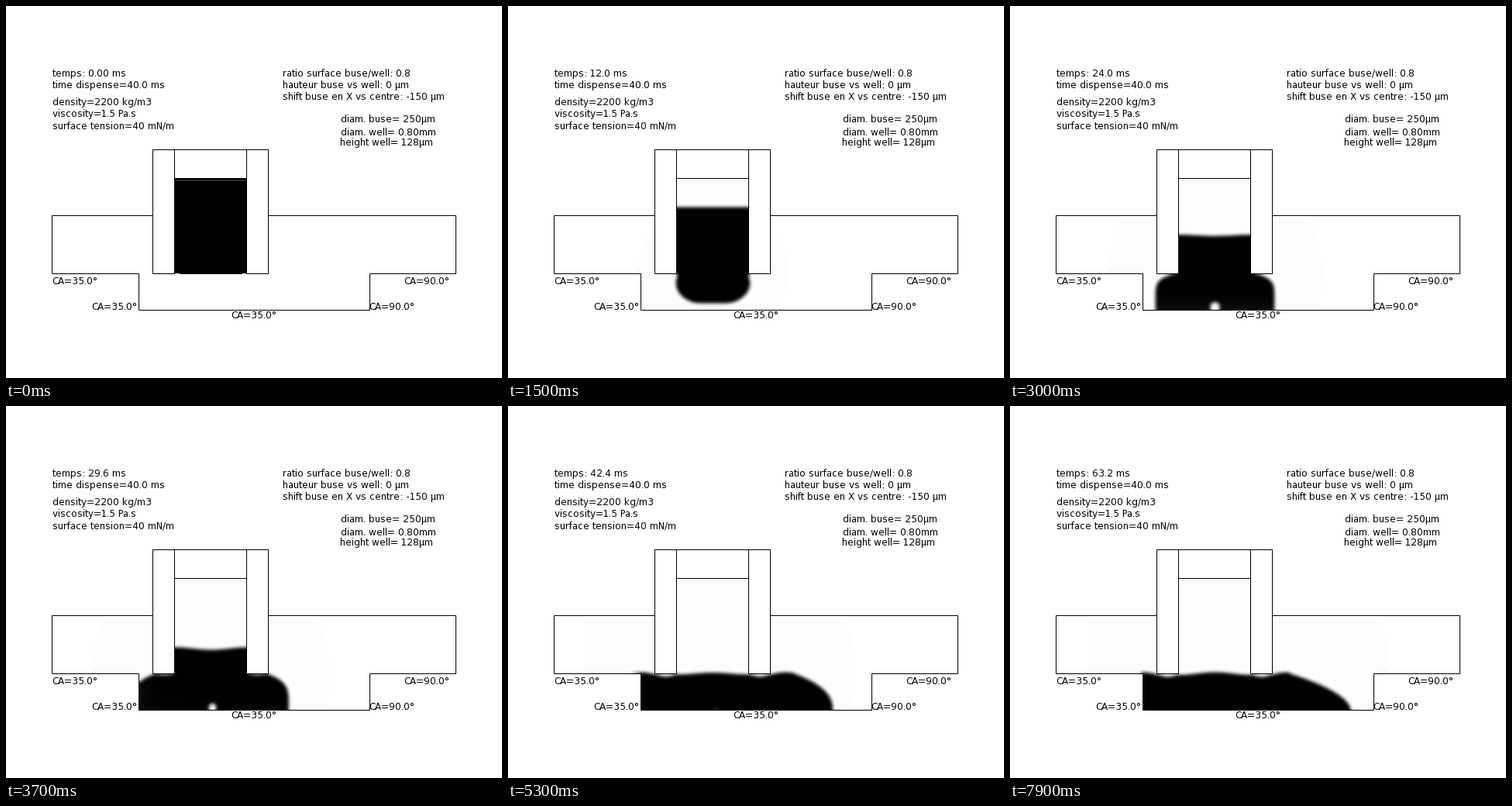
A matplotlib script for the animation above (8000 ms loop, 640 by 480 pixels).

```python
import numpy as np
import matplotlib.pyplot as plt
from matplotlib.animation import FuncAnimation

W, H, DPI = 640, 480, 80
FRAMES, STEP = 80, 100
PX = 72 / DPI

# Whole-pixel letter spacing
plt.rcParams["text.hinting_factor"] = 1

# Pixel window that the liquid can reach
X0, X1, Y0, Y1 = 100, 500, 215, 393
x = np.arange(X0, X1) + 0.5
y = (np.arange(Y0, Y1) + 0.5)[:, None]

AXIS, BORE, LIP, FLOOR = 264.5, 46.5, 345, 392.5
SIGMA = 2.2

dist = np.abs(x - AXIS)
in_bore = dist < BORE
in_nozzle = (x > 190) & (x < 338)
domain = (((y > LIP) & (y < FLOOR) & (x > 171) & (x < 469))
          | ((y > 223) & (y < LIP + 1) & in_bore)
          | ((y > 270) & (y < LIP) & ~in_nozzle)).astype(float)


def blur_matrix(n):
    d = np.subtract.outer(np.arange(n), np.arange(n))
    return np.exp(-d**2 / (2 * SIGMA**2))


GX, GY = blur_matrix(X1 - X0), blur_matrix(Y1 - Y0)
weight = GY @ domain @ GX + 1e-9


def ramp(t, a, b):
    u = np.clip((t - a) / (b - a), 0, 1)
    return u * u * (3 - 2 * u)


def mix(a, b, s):
    return a + (b - a) * s


def bell(d, width):
    return np.exp(-(d / width)**2)


def soft(d):
    return np.clip(d + 0.5, 0, 1)


def top_edge(t):
    """Free surface: falling level in the bore, sag below the rims, crests outside."""
    level = min(223 + 24.3 * t, 345.2)
    wave = 2 * ramp(t, 2, 4.4) - 3.75 * ramp(t, 4.4, 5.6)
    inner = level + wave * np.cos(np.pi * dist / BORE)
    outer = (LIP + 4.5 * ramp(t, 1.8, 6) * bell(dist - 60.5, 14)
             - 1.5 * ramp(t, 3, 4.4) * bell(dist - 92.5, 12))
    return np.where(in_bore, inner, outer)


def half_width(t, v):
    """Half width at depth fraction v: dome, then pancake, then spreading puddle."""
    foot = 112 + 65 * np.tanh((t - 4) / 1.65)
    dome = BORE * np.sqrt(1 - v**2)
    pancake = foot - 21.5 * (1 - np.sqrt(1 - (2 * v - 1)**2))
    slump = 27 + 53 * ramp(t, 3, 8)
    power = 1.9 + 6 * np.exp((3 - t) / 1.1)
    puddle = foot - slump * (1 - v)**power
    w = mix(mix(dome, pancake, np.clip((t - 0.9) / 1.2, 0, 1)),
            puddle, ramp(t, 2.1, 3))
    return np.maximum(w, BORE * (v < 0.1))


def bubble(t):
    """Air film trapped on the floor, closing to a bubble that shrinks away."""
    r = 6.3 * np.sqrt(max(0, 5.4 - t) / 3)
    if t <= 2.1 or r < 0.3:
        return 0
    a = r + 44 * np.exp((2.1 - t) / 0.2)
    b = r * ramp(t, 1.7, 2.6)
    cx = AXIS + 4 * ramp(t, 3, 4.4)
    cy = FLOOR - 0.8 * b
    return soft((1 - np.hypot((x - cx) / a, (y - cy) / b)) * b)


def liquid(t):
    depth = 1 + 44 * np.tanh(t / 1.18) + 5 * ramp(t, 2.1, 2.4)
    v = np.clip((y - LIP) / depth, 0, 1)
    body = (soft(y - top_edge(t)) * soft(half_width(t, v) - dist)
            * soft(LIP + depth - y))
    return body * (1 - bubble(t)) * domain


def shade(t):
    body = liquid(t)
    if t == 0:
        return 1 - body * np.where(np.abs(y - 225) < 1, 0.82, 1)
    dark = GY @ body @ GX / weight
    # Traces of air in the liquid and of liquid in the air
    haze = (0.06 * np.exp((y - FLOOR) / 10) * bell(t - 3, 0.7)
            + 0.1 * np.exp(-np.abs(x - 171) / 10) * bell(t - 4.3, 0.7))
    mist = (np.hypot(dist, y - LIP) < 80 * np.sqrt(t)) | in_bore
    dark = np.maximum(dark * (1 - haze), 0.008 * mist)
    return 1 - dark * domain


def clock(t):
    ms = 8 * t
    return f"temps: {ms:.{2 if ms < 9.99 else 1}f} ms"


fig = plt.figure(figsize=(W / DPI, H / DPI), dpi=DPI, facecolor="white")
ax = fig.add_axes([0, 0, 1, 1])
image = ax.imshow(shade(0), cmap="gray", vmin=0, vmax=1, aspect="auto",
                  extent=(X0, X1, Y1, Y0), interpolation="nearest", zorder=0)
ax.set_xlim(0, W)
ax.set_ylim(H, 0)
ax.axis("off")


def line(*pts):
    px, py = np.array(pts).T + 0.5
    ax.plot(px, py, color="black", lw=PX, solid_joinstyle="miter",
            solid_capstyle="projecting", snap=False, zorder=2)


def label(px, base, s):
    return ax.text(px, base, s, family="DejaVu Sans", size=12 * PX,
                   va="baseline", ha="left", color="black", zorder=3)


line((189, 270), (59, 270), (59, 345), (171, 345), (171, 392), (469, 392),
     (469, 345), (580, 345), (580, 270), (338, 270))
for left, right in ((189, 217), (310, 338)):
    line((left, 185), (right, 185), (right, 345), (left, 345), (left, 185))
for row in (185, 222):
    line((217, row), (310, row))

timer = label(60, 91, clock(0))
for px, base, s in [
    (60, 106, "time dispense=40.0 ms"),
    (60, 128, "density=2200 kg/m3"),
    (60, 143, "viscosity=1.5 Pa.s"),
    (60, 159, "surface tension=40 mN/m"),
    (357, 91, "ratio surface buse/well: 0.8"),
    (357, 106, "hauteur buse vs well: 0 µm"),
    (357, 121, "shift buse en X vs centre: -150 µm"),
    (432, 150, "diam. buse= 250µm"),
    (432, 167, "diam. well= 0.80mm"),
    (431, 180, "height well= 128µm"),
    (59, 359, "CA=35.0°"),
    (110, 392, "CA=35.0°"),
    (290, 403, "CA=35.0°"),
    (468, 392, "CA=90.0°"),
    (513, 359, "CA=90.0°"),
]:
    label(px, base, s)


def update(i):
    t = i * STEP / 1000
    image.set_data(shade(t))
    timer.set_text(clock(t))
    return image, timer


anim = FuncAnimation(fig, update, frames=FRAMES, interval=STEP,
                     repeat=True, repeat_delay=0, blit=False)
plt.show()
```
